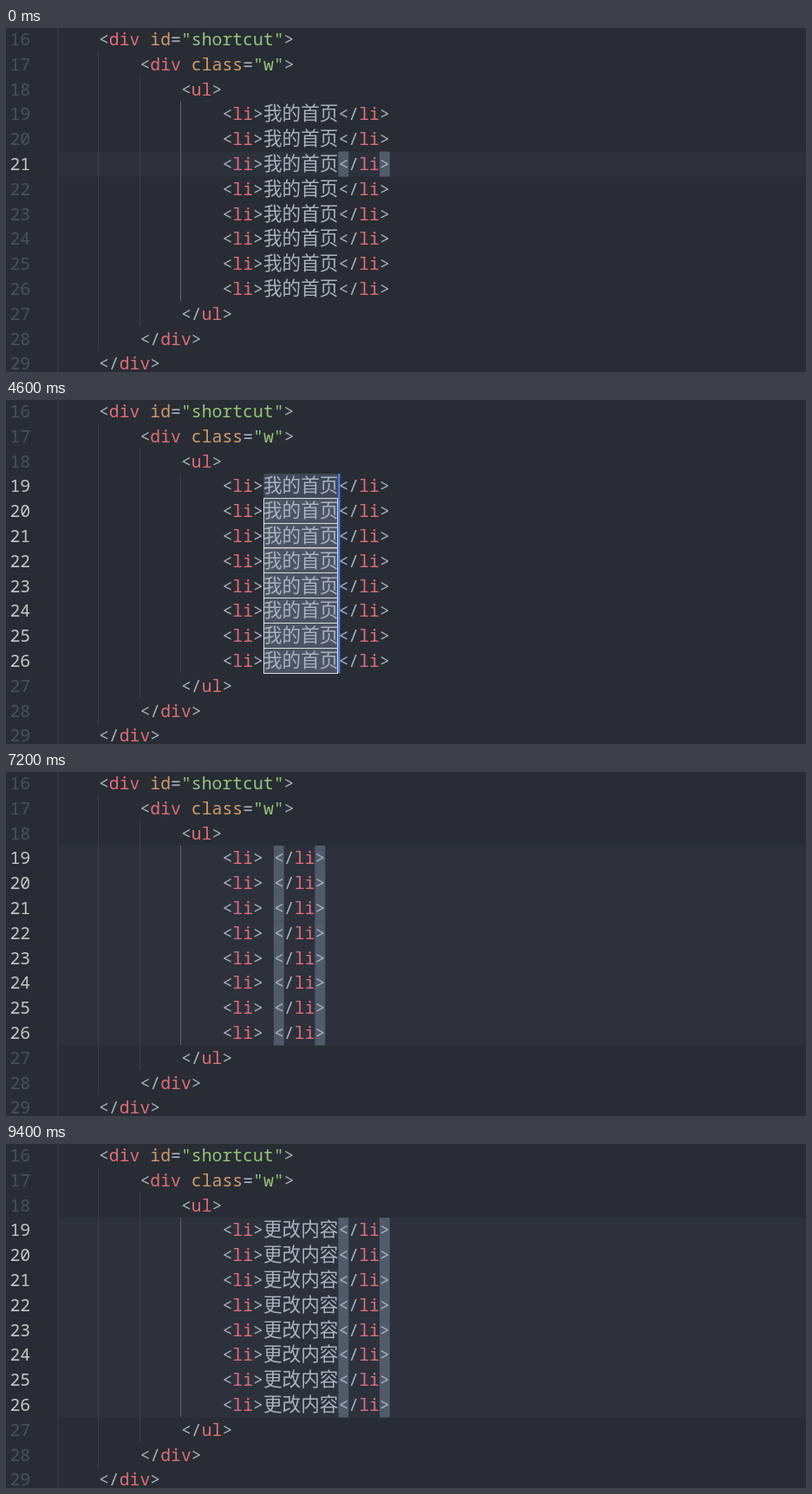
An HTML page for the animation above (9.8 s loop, 923 px wide and 397 px high).

```html
<!DOCTYPE html>
<html lang="zh">
<head>
<meta charset="utf-8">
<title>Multi-cursor editing</title>
<style>
  html, body { margin: 0; width: 100%; height: 100%; overflow: hidden; background: #282c34; }
  svg { display: block; width: 923px; height: 397px; }
  text { font: 19.8px "Noto Sans Mono", monospace; fill: #abb2bf; white-space: pre; }
  .tag { fill: #e06c75; }
  .attr { fill: #d19a66; }
  .str { fill: #98c379; }
  .cjk { font: 300 21.6px "Noto Sans CJK SC", sans-serif; }
  .num { fill: #495162; }
  .num.on { fill: #c6c6c6; }
  .typed { font: bold 16px "Liberation Sans", Arial, sans-serif; fill: #1262b8; }
  .cand { font: 13.33px "Liberation Mono", monospace; fill: #0f8cb4; }
  .cand tspan { font: 16px "Noto Sans CJK SC", sans-serif; }
  .cand.first { fill: #cc2028; }
</style>
</head>
<body>
<svg id="stage" viewBox="0 0 923 397"></svg>
<script>
const LOOP = 9800, CW = 11.88, HAN = 21.6, LH = 28.8, X0 = 59.4;
const FIRST = 19, LAST = 26;
const stage = document.getElementById('stage');
const pen = document.createElement('canvas').getContext('2d');

const colX = n => X0 + n * CW;
const rowY = n => 85 + (n - FIRST) * LH;
const TEXT_X = colX(20);
const ITEMS = Array.from({ length: LAST - FIRST + 1 }, (_, i) => FIRST + i);

// Blinking cursor: on and off times
const BLINK = [900, 2000, 2500, 2900, 3100, 5000, 5500, 6000, 6400, 6600, 8000, 8500, 9000, 9400];
// Times at which one more line joins the selection
const SELECT = [1600, 3100, 3400, 3700, 3900, 4200, 4400, 4600];
// Input method: start time, typed letters, candidates
const TYPING = [
  [6600, "g", "个 给 过 跟 国家"],
  [6700, "ge", "个 各 歌 哥 隔开"],
  [6800, "gen", "跟 根 亘 艮 跟着"],
  [7000, "geng'g", "更改 更高 更广 更该 更好"],
  [7100, "geng'gai", "更改 更该 更改为 更改密码 更改后"],
  [7200, "", ""],
  [7400, "n", "你 年 那 能 呢"],
  [7500, "ne", "呢 哪 讷 那 内"],
  [7600, "ner", "呢 内容 女儿 那 哪"],
  [7700, "ner'i", "内容 呢日 呢 那 哪"],
  [7800, "ner'io", "内容 呢日欧 呢 那 哪"],
  [7900, "ner'iong", "内容 呢日欧诺个 呢 那 哪"],
  [8000, "", ""]
];

const rect = (x, y, w, h, fill, more = '') =>
  `<rect x="${x}" y="${y}" width="${w}" height="${h}" fill="${fill}" ${more}/>`;
const label = (x, y, s, cls = '') => `<text x="${x}" y="${y}" class="${cls}">${s}</text>`;
const span = (cls, s) => `<tspan class="${cls}">${s}</tspan>`;
const code = (x, n, s) => label(x, rowY(n) + 21.3, s);
const openTag = (tag, attr, val) =>
  '&lt;' + span('tag', tag) + (attr ? ' ' + span('attr', attr) + '=' + span('str', `"${val}"`) : '') + '&gt;';
const closeTag = tag => '&lt;/' + span('tag', tag) + '&gt;';

function stateAt(t) {
  const s = { cursor: BLINK.filter(b => b <= t).length % 2, selected: 0, word: '我的首页', gap: 0, typed: '', cands: '' };
  const lineAt = u => u < 900 ? 21 : u < 1300 ? 20 : 19;
  if (t < 1600) {
    s.active = [lineAt(t)];
    s.brackets = [lineAt(t - 100)];
  } else if (t < 6600) {
    s.selected = SELECT.filter(b => b <= t).length;
    s.active = ITEMS.slice(0, s.selected);
    s.brackets = [];
  } else {
    [, s.typed, s.cands] = TYPING.filter(k => k[0] <= t).pop();
    s.word = t < 7300 ? '' : t < 8000 ? '更改' : '更改内容';
    s.gap = s.typed || t < 7300 ? 1 : 0;
    s.active = s.brackets = ITEMS;
  }
  return s;
}

function popup(x, typed, cands) {
  const y = 112;
  let cx = x + 13, row = '';
  cands.split(' ').forEach((c, i) => {
    row += label(cx, y + 47, `${i + 1}.<tspan>${c}</tspan>`, i ? 'cand' : 'cand first');
    cx += 29 + 16 * c.length;
  });
  const right = cx + 60, w = right - x;
  pen.font = 'bold 16px "Liberation Sans", Arial, sans-serif';
  const caret = x + 11.5 + pen.measureText(typed).width;
  const button = (bx, d) =>
    rect(bx + .5, y + 35.5, 13, 13, '#f4fafd', 'stroke="#b4d5e6"') +
    `<path d="${d}" transform="translate(${bx + 7} ${y + 42})" fill="#1583b5"/>`;
  return rect(x + .5, y + .5, w - 1, 55, '#fdfdfd', 'stroke="#c9d3da"') +
    rect(x + 1, y + 27, w - 33, 1, '#dde3e7') +
    label(x + 11, y + 20, typed, 'typed') +
    rect(caret, y + 5, 1.4, 19, '#d03038') + row +
    `<g opacity=".5">${button(right - 61, 'M2-3V3L-2 0Z')}</g>` +
    button(right - 46, 'M-2-3V3L2 0Z') + button(right - 24, 'M-3-1.5H3L0 2Z') +
    rect(right - 31, y + 2, 29, 29, '#ef8a68');
}

function draw(s) {
  const end = TEXT_X + s.word.length * HAN;
  const after = end + s.gap * CW;
  let out = '';

  if (!s.selected) out += rect(60, rowY(s.active[0]), 863, s.active.length * LH, '#2c313c');

  // Indent guides
  out += rect(59.5, 0, 1, 397, '#3b4048');
  for (let i = 1; i < 4; i++) {
    const from = rowY(16 + i), to = rowY(30 - i);
    out += rect(Math.floor(colX(4 * i)), from, 1, to - from, i == 3 && !s.selected ? '#60656c' : '#3b4048');
  }
  for (const n of s.brackets)
    for (const x of [after, after + 4 * CW]) out += rect(x, rowY(n), CW, LH + .2, '#515a6b');

  if (s.selected) ITEMS.forEach((n, i) => {
    if (i < s.selected) out += rect(TEXT_X, rowY(n), 4 * HAN, LH, '#404859', i ? '' : 'rx="3"');
    if (i) out += rect(297.5, Math.round(rowY(n)) - .5, 85, 29, '#ffffff10', 'stroke="#ddd"');
  });

  for (let n = 16; n < 30; n++)
    out += label(4.5, rowY(n) + 21.3, n, s.active.includes(n) ? 'num on' : 'num');

  out += code(colX(4), 16, openTag('div', 'id', 'shortcut')) +
    code(colX(8), 17, openTag('div', 'class', 'w')) +
    code(colX(12), 18, openTag('ul'));
  for (const n of ITEMS)
    out += code(colX(16), n, openTag('li')) +
      label(TEXT_X, rowY(n) + 21.3, s.word, 'cjk') +
      code(after, n, closeTag('li'));
  out += code(colX(12), 27, closeTag('ul')) +
    code(colX(8), 28, closeTag('div')) +
    code(colX(4), 29, closeTag('div'));

  if (s.cursor)
    for (const n of s.active) out += rect(383.3, rowY(n), 2, LH, '#528bff');
  if (s.typed) out += popup(Math.round(end) - 1, s.typed, s.cands);
  stage.innerHTML = out;
}

let shown = '';
function frame(now) {
  const s = stateAt(now % LOOP), key = JSON.stringify(s);
  if (key != shown) draw(s);
  shown = key;
  requestAnimationFrame(frame);
}
frame(0);
</script>
</body>
</html>
```
